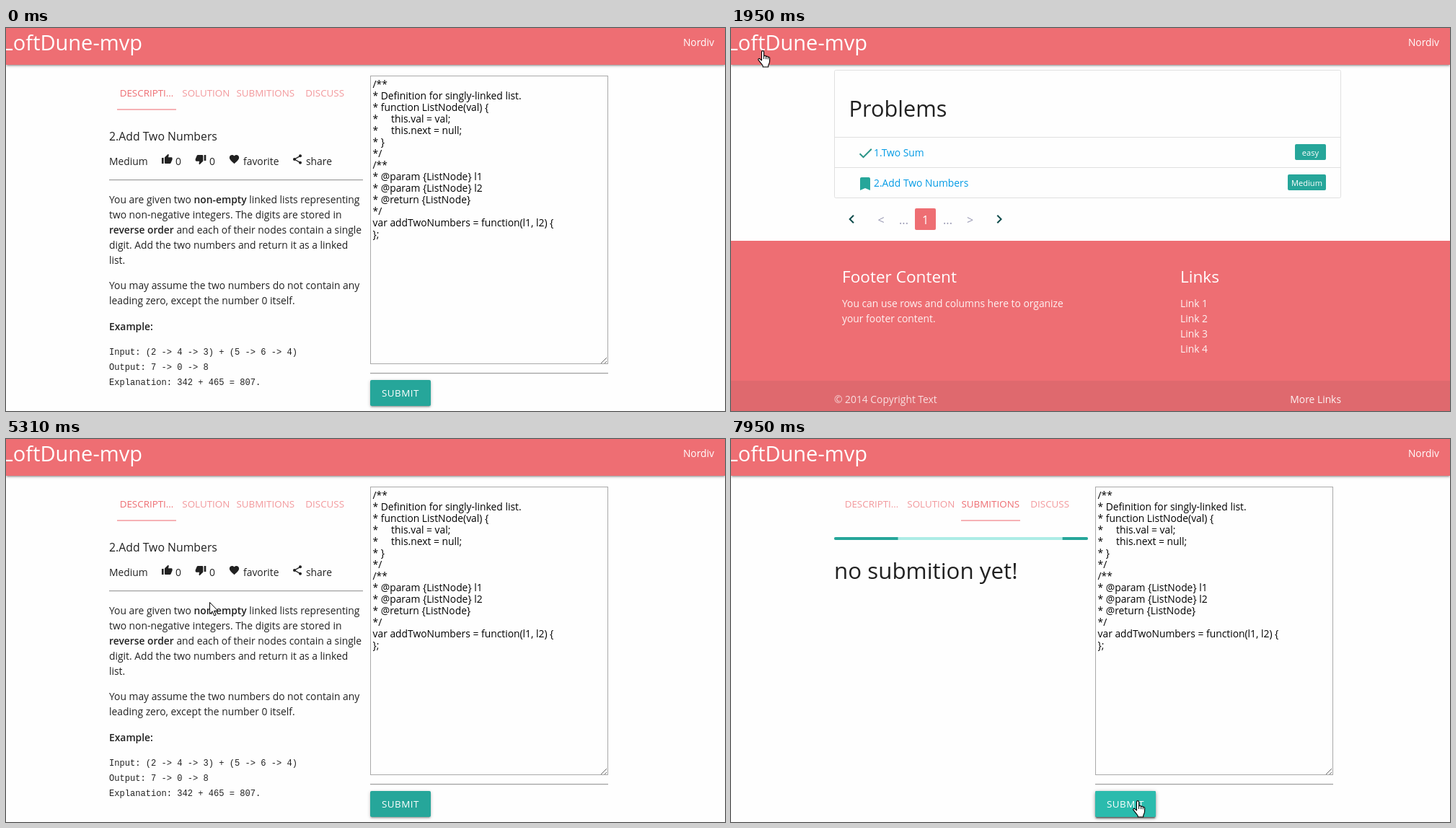
Write an HTML page that moves like this. It is 997 px wide and 531 px high and loops after 8000 ms.

```html
<!DOCTYPE html>
<html lang="en">
<head>
<meta charset="utf-8">
<title>Coding practice</title>
<style>
html, body { margin: 0; width: 100%; height: 100%; overflow: hidden; background: #fefefe; }
div, svg { position: absolute; left: 0; top: 0; }
svg { width: 997px; height: 531px; overflow: hidden; }
text { font-family: "Open Sans", "Noto Sans", sans-serif; font-size: 13.85px; fill: #212121; white-space: pre; }
.mono { font-family: "Liberation Mono", monospace; font-size: 12.08px; }
.b { font-weight: 600; }
#bar { width: 997px; height: 51px; background: #ee6e73;
  box-shadow: 0 2px 2px rgba(0,0,0,.14), 0 3px 1px -2px rgba(0,0,0,.12), 0 1px 5px rgba(0,0,0,.2); }
.btn { left: 505px; top: 488px; width: 84px; height: 36px; border-radius: 2px; background: #26a69a;
  box-shadow: 0 2px 2px rgba(0,0,0,.14), 0 3px 1px -2px rgba(0,0,0,.12), 0 1px 5px rgba(0,0,0,.2); }
#hover { background: #2bbbad;
  box-shadow: 0 3px 3px rgba(0,0,0,.14), 0 1px 7px rgba(0,0,0,.12), 0 3px 1px -1px rgba(0,0,0,.2); }
</style>
</head>
<body>
<div id="bar"></div>
<div id="buttons"><div class="btn"></div><div class="btn" id="hover"></div></div>
<svg id="stage" viewBox="0 0 997 531"></svg>
<script>
const $ = id => document.getElementById(id);
const PINK = '#ee6e73', TEAL = '#26a69a', SOFT = '#fdf3f3';

// ---- drawing helpers ----
const text = (x, y, s, o = {}) =>
  `<text x="${x}" y="${y}" class="${o.cls || ''}" text-anchor="${o.anchor || 'start'}" ` +
  `style="${o.size ? `font-size:${o.size}px;` : ''}${o.fill ? `fill:${o.fill};` : ''}${o.css || ''}">${s}</text>`;
const lines = (x, y, gap, list, o) => list.map((s, i) => text(x, y + i * gap, s, o)).join('');
const rect = (x, y, w, h, fill, more = '') =>
  `<rect x="${x}" y="${y}" width="${w}" height="${h}" fill="${fill}" ${more}/>`;
const icon = (x, y, size, d, fill = '#212121', turn = 0) =>
  `<path transform="translate(${x} ${y}) scale(${size / 24}) rotate(${turn} 12 12)" d="${d}" fill="${fill}"/>`;
const group = (id, body) => `<g id="${id}">${body}</g>`;
const rule = (x, y, w) => rect(x, y, w, 1, '#9a9a9a') + rect(x, y + 1, w, 1, '#eee');
const bold = s => `<tspan class="b">${s}</tspan>`;

const THUMB = 'M1 21h4V9H1v12zm22-11c0-1.1-.9-2-2-2h-6.31l.95-4.57.03-.32c0-.41-.17-.79-.44-1.06L14.17 1 7.59 7.59C7.22 7.95 7 8.45 7 9v10c0 1.1.9 2 2 2h9c.83 0 1.54-.5 1.84-1.22l3.02-7.05c.09-.23.14-.47.14-.73v-2z';
const HEART = 'M12 21.35l-1.45-1.32C5.4 15.36 2 12.28 2 8.5 2 5.42 4.42 3 7.5 3c1.74 0 3.41.81 4.5 2.09C13.09 3.81 14.76 3 16.5 3 19.58 3 22 5.42 22 8.5c0 3.78-3.4 6.86-8.55 11.54z';
const CHECK = 'M9 16.17L4.83 12l-1.42 1.41L9 19 21 7l-1.41-1.41z';
const MARK = 'M17 3H7c-1.1 0-2 .9-2 2v16l7-3 7 3V5c0-1.1-.9-2-2-2z';
const CHEVRON = 'M10 6L8.59 7.41 13.17 12l-4.58 4.59L10 18l6-6z';
const SHARE = '<g transform="translate(396 174) scale(.667)" fill="#212121">' +
  '<circle cx="18" cy="5" r="3"/><circle cx="6" cy="12" r="3"/><circle cx="18" cy="19" r="3"/>' +
  '<path d="M18 5L6 12l12 7" fill="none" stroke="#212121" stroke-width="2"/></g>';

// ---- header ----
const header =
  text(189, 31, 'LoftDune-mvp', { size: 29, fill: '#fff', anchor: 'end' }) +
  text(982, 25, 'Nordiv', { fill: '#fff', anchor: 'end' });

// ---- problem page ----
const tab = (id, x, s) => group(id, text(x, 95, s, { size: 13.4, fill: PINK, anchor: 'middle' }));
const tabs = tab('tabA', 195, 'DESCRIPTI…') + tab('tabB', 277.3, 'SOLUTION') +
  tab('tabC', 359.8, 'SUBMITIONS') + tab('tabD', 442.2, 'DISCUSS') +
  rect(154, 112, 82, 2, '#f6b2b5', 'id="line"');

const description =
  text(143, 156, '2.Add Two Numbers', { size: 15.8 }) +
  text(143, 190, 'Medium') +
  icon(215.3, 174, 16, THUMB) + text(235, 190, '0') +
  icon(262, 174, 16, THUMB, '#212121', 180) + text(282, 190, '0') +
  icon(308.5, 174, 16, HEART) + text(329, 190, 'favorite') +
  SHARE + text(416, 190, 'share') +
  rule(143, 210, 352) +
  lines(143, 243, 21, [
    `You are given two ${bold('non-empty')} linked lists representing`,
    'two non-negative integers. The digits are stored in',
    `${bold('reverse order')} and each of their nodes contain a single`,
    'digit. Add the two numbers and return it as a linked',
    'list.']) +
  lines(143, 362, 21, [
    'You may assume the two numbers do not contain any',
    'leading zero, except the number 0 itself.']) +
  text(143, 419, 'Example:', { cls: 'b' }) +
  lines(143, 452.5, 21, [
    'Input: (2 -&gt; 4 -&gt; 3) + (5 -&gt; 6 -&gt; 4)',
    'Output: 7 -&gt; 0 -&gt; 8',
    'Explanation: 342 + 465 = 807.'], { cls: 'mono' });

const result =
  '<clipPath id="track"><rect x="143" y="136" width="352" height="4" rx="2"/></clipPath>' +
  '<g clip-path="url(#track)">' + rect(143, 136, 352, 4, '#acece6') +
  rect(143, 136, 0, 4, TEAL, 'id="long"') + rect(143, 136, 0, 4, TEAL, 'id="short"') + '</g>' +
  text(143, 194, 'no submition yet!', { size: 31.3 });

const code = lines(508.5, 83, 16, [
  '/**',
  '* Definition for singly-linked list.',
  '* function ListNode(val) {',
  '*     this.val = val;',
  '*     this.next = null;',
  '* }',
  '*/',
  '/**',
  '* @param {ListNode} l1',
  '* @param {ListNode} l2',
  '* @return {ListNode}',
  '*/',
  'var addTwoNumbers = function(l1, l2) {',
  '};'], { fill: '#000' });

const editor =
  rect(505.5, 66.5, 329, 399, '#fefefe', 'stroke="#a9a9a9"') +
  '<path d="M825 465l8-8M830 465l3-3" stroke="#666" stroke-width="1"/>' +
  group('code', code) + rule(505, 478, 330) +
  text(521, 511, 'SUBMIT', { size: 13.4, fill: '#fff', css: 'letter-spacing:.5px' });

// ---- list page ----
const badge = (x, y, s) => rect(x, y, 825 - x, 22, TEAL, 'rx="2"') +
  text((x + 825) / 2, y + 16, s, { size: 11.1, fill: '#fff', anchor: 'middle' });
const dim = (x, s) => text(x, 272, s, { size: 16, fill: '#9a9ab4', anchor: 'middle' });
const list =
  rect(143.5, 58.5, 702, 177, '#fefefe', 'rx="2" stroke="#e0e0e0"') +
  rect(144, 151, 701, 1, '#e0e0e0') + rect(144, 193, 701, 1, '#e0e0e0') +
  text(163.5, 123, 'Problems', { size: 30.7 }) +
  icon(174.5, 161.5, 24, CHECK, '#2a9587') + text(198, 178, '1.Two Sum', { fill: '#039be5' }) +
  icon(174, 204, 24, MARK, TEAL) + text(198, 220, '2.Add Two Numbers', { fill: '#039be5' }) +
  badge(782, 161, 'easy') + badge(772, 203, 'Medium') +
  icon(155.3, 253, 24, CHEVRON, '#0d4b4b', 180) + icon(360, 253, 24, CHEVRON, '#0d4b4b') +
  dim(208, '&lt;') + dim(239.5, '...') + dim(300.5, '...') + dim(331.5, '&gt;') +
  rect(255, 250, 29, 30, PINK, 'rx="2"') + text(269.5, 271.5, '1', { size: 16, fill: '#fff', anchor: 'middle' }) +
  rect(0, 295, 997, 236, PINK) + rect(0, 489, 997, 42, '#df696e') +
  text(154, 353, 'Footer Content', { size: 22.6, fill: '#fff' }) +
  lines(154, 387, 21, ['You can use rows and columns here to organize', 'your footer content.'], { fill: SOFT }) +
  text(623, 353, 'Links', { size: 22.6, fill: '#fff' }) +
  lines(623, 387, 21, [1, 2, 3, 4].map(n => 'Link ' + n), { fill: SOFT }) +
  text(143, 520, '© 2014 Copyright Text', { fill: '#f9dfe0' }) +
  text(846, 520, 'More Links', { fill: SOFT, anchor: 'end' });

// ---- pointers, drawn from their top left corner ----
const pointers = '<g stroke="#000" fill="#fff" stroke-linejoin="round">' +
  '<path id="arrow" d="M.5.5V16.5L4.2 13 6.8 19 9.2 18 6.6 12.2H11.8Z"/>' +
  '<g id="hand"><path stroke-width="1.1" d="M5.5 2C5.5.1 8.6.1 8.6 2V8C9.1 7 11.3 7.2 11.6 8.6 12.2 7.8 14.1 8.1 14.3 9.5 15 8.9 16.6 9.3 16.6 10.8V15C16.6 18 15.1 19.5 14.7 21V23H7.2V21.5C6 19 3 16 1 13.4.2 12 1.9 10.7 3.1 11.8L5.5 14Z"/>' +
  '<path d="M8.6 8v4M11.6 8.8v3.4M14.3 9.6v2.8" fill="none"/></g>' +
  '<path id="beam" d="M0 .5H3L4 1.5 5 .5H8M4 1.5V14.5M0 15.5H3L4 14.5 5 15.5H8" fill="none"/></g>';
const HOT = { arrow: [0, 0], hand: [6, 0], beam: [4, 8] };

$('stage').innerHTML = header +
  group('problem', tabs + group('desc', description) + group('result', result) + editor) +
  group('list', list) + group('pointer', pointers);

// ---- timing ----
const LOOP = 8000, LIST = 1950, OPEN = 4190, FILL = 4240, SEND = 6740;
const clamp = v => Math.max(0, Math.min(1, v));
const stepped = (t, a, b, n) =>
  t < a ? 0 : (Math.min(n - 1, Math.floor((t - a) / (b - a) * (n - 1) + 1e-6)) + 1) / n;

// start, end, steps, then from, bend and to
const MOVES = [
  [150, 920, 18, [830, 541], [440, 290], [49, 41]],
  [1020, 1210, 4, [49, 41], [46, 36], [43, 31]],
  [2510, 2930, 10, [43, 31], [150, 125], [258, 220]],
  [3210, 3260, 2, [258, 220], [258, 218], [258, 216]],
  [5310, 6080, 18, [258, 216], [640, 380], [571, 463]],
  [6130, 6520, 8, [571, 463], [568, 482], [563, 501]]
];

function pointerAt(t) {
  const move = MOVES.filter(m => t >= m[0]).pop();
  if (!move) return null;
  const [a, b, n, from, bend, to] = move;
  const s = stepped(t, a, b, n), p = s / 2 + s * s * (3 - 2 * s) / 2, q = 1 - p;
  return [0, 1].map(i => Math.round(q * q * from[i] + 2 * p * q * bend[i] + p * p * to[i]));
}

function pointerKind(x, y, onList) {
  const over = (l, t, r, b) => x >= l && x < r && y >= t && y < b;
  if (over(0, 0, 190, 51)) return 'hand';
  if (onList) return over(198, 204, 328, 226) ? 'hand' : 'arrow';
  if (over(505, 488, 589, 524)) return 'hand';
  return over(505, 66, 835, 466) || over(143, 230, 490, 390) ? 'beam' : 'arrow';
}

function bezier(x1, y1, x2, y2) {
  const at = (a, b, u) => 3 * a * u * (1 - u) ** 2 + 3 * b * u * u * (1 - u) + u ** 3;
  return x => {
    let lo = 0, hi = 1;
    for (let i = 0; i < 30; i++) {
      const mid = (lo + hi) / 2;
      if (at(x1, x2, mid) < x) lo = mid; else hi = mid;
    }
    return at(y1, y2, lo);
  };
}
const longEase = bezier(.65, .815, .735, .395), shortEase = bezier(.165, .84, .44, 1);

function span(el, left, right) {
  el.setAttribute('x', left);
  el.setAttribute('width', Math.max(0, right - left));
}
const show = (id, on) => { $(id).style.display = on ? '' : 'none'; };

// one busy-bar stripe; left and right are insets in percent
function stripe(id, p, left, right) {
  const l = left[0] + (left[1] - left[0]) * p, r = right[0] + (right[1] - right[0]) * p;
  span($(id), 143 + 3.52 * l, 143 + 3.52 * (100 - r));
}

function render(t) {
  const onList = t >= LIST && t < OPEN, sent = t >= SEND;
  show('list', onList);
  show('problem', !onList);
  show('buttons', !onList);
  show('code', t < OPEN || t >= FILL);
  show('desc', !sent);
  show('result', sent);
  $('hover').style.opacity = clamp((t - 6370) / 150);

  const beat = 1210 / 26;
  const age = sent ? Math.floor((t - SEND) / beat + 1e-6) * beat + 7 : 0;
  const fade = clamp(age / 280);
  $('tabA').style.opacity = 1 - .3 * fade;
  $('tabB').style.opacity = $('tabD').style.opacity = .7;
  $('tabC').style.opacity = .7 + .3 * fade;
  const slide = delay => 165 * (1 - (1 - clamp((age - delay) / 300)) ** 2);
  span($('line'), 154 + slide(90), 236 + slide(0));
  stripe('long', longEase(clamp(age / 1260)), [-35, 100], [100, -90]);
  stripe('short', shortEase(clamp((age - 1150) / 1260)), [-200, 107], [100, -8]);

  const pos = pointerAt(t);
  show('pointer', pos);
  if (!pos) return;
  const kind = pointerKind(pos[0], pos[1], onList);
  for (const k in HOT) show(k, k === kind);
  $('pointer').setAttribute('transform', `translate(${pos[0] - HOT[kind][0]} ${pos[1] - HOT[kind][1]})`);
}

const began = performance.now();
function tick() {
  render((performance.now() - began) % LOOP);
  requestAnimationFrame(tick);
}
tick();
</script>
</body>
</html>
```
